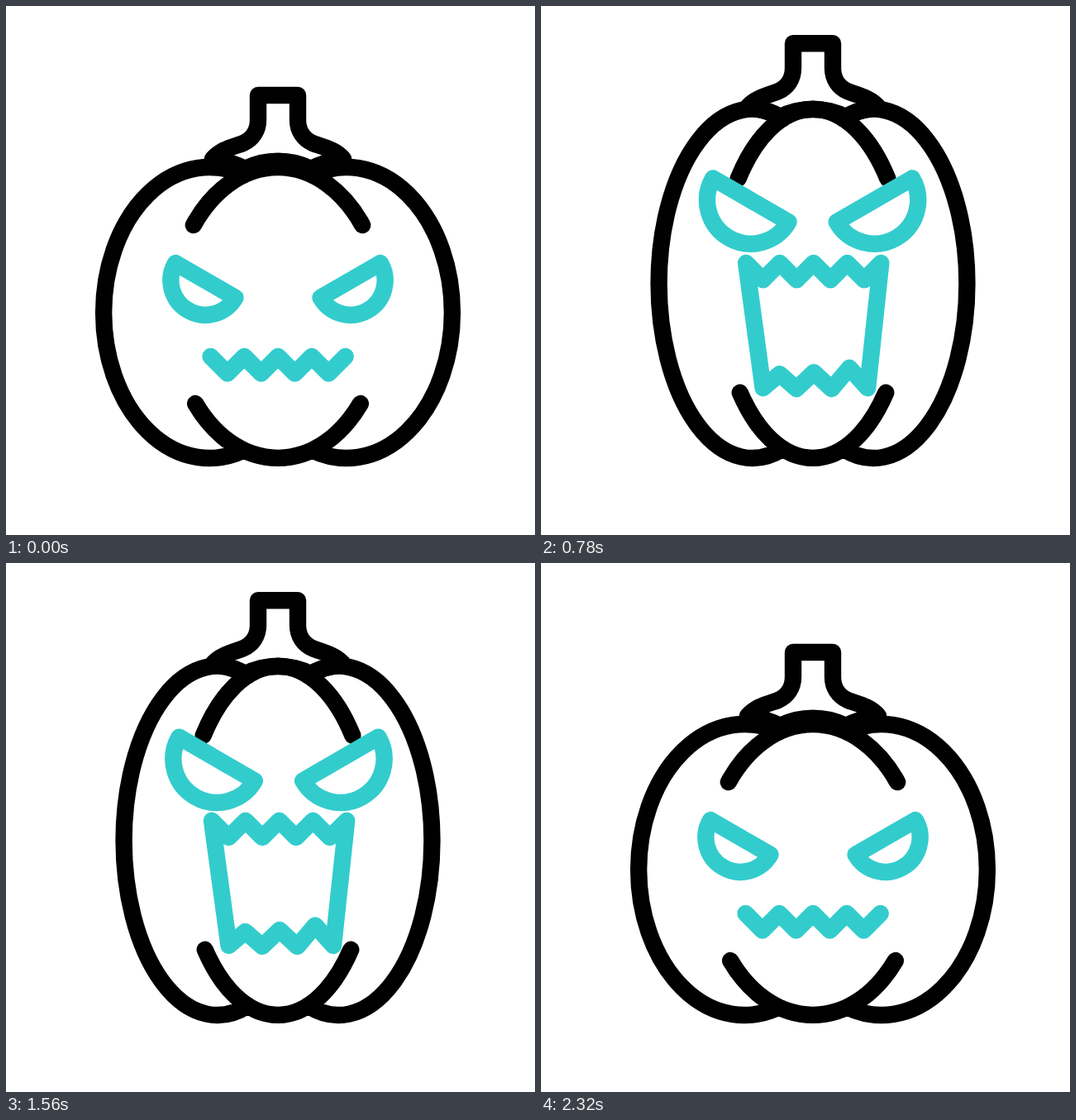
These frames come from a looping animation (640x640 px, 2520 ms). An HTML page:

```html
<!DOCTYPE html>
<html lang="en">
<head>
<meta charset="utf-8">
<title>Pumpkin</title>
<style>
  html, body { margin: 0; width: 100%; height: 100%; overflow: hidden; background: #fff; }
  svg { display: block; width: 100%; height: 100%; }
  path { fill: none; stroke-width: 20.4; stroke-linecap: round; stroke-linejoin: round; }
  #body, #stem { stroke: #000; }
  #eyes, #mouth { stroke: #33cccc; }
</style>
</head>
<body>
<svg viewBox="0 0 640 640">
  <path id="body"/>
  <path id="stem" d="M250 185C260 173 277 170 287 166C298 161 305 151 305 138V108H353V138C353 151 360 161 371 166C381 170 398 173 408 185Q386 188 369 197Q350 187.7 329 187.7Q308 187.7 289 197Q272 188 250 185Z"/>
  <path id="eyes"/>
  <path id="mouth"/>
</svg>
<script>
const LOOP = 2520, RISE = 200, FALL_END = 2318, MID = 329, FLOOR = 547;
const $ = id => document.getElementById(id);
const lerp = (a, b, p) => a + (b - a) * p;
const clamp = v => Math.max(0, Math.min(1, v));
const smooth = u => u * u * (3 - 2 * u);

// 0 at rest, 1 fully stretched
const stretch = (t, duration) =>
  smooth(clamp(Math.min(t - RISE, FALL_END - t) / duration));

function bodyPath(p) {
  const sx = lerp(1, 0.884, p), sy = lerp(1, 1.2, p);
  const rx = 128 * sx, ry = 176 * sy, cy = FLOOR - ry;
  // elliptic arc between two points given in units of the radii
  const arc = (cx, x1, y1, x2, y2, flags) =>
    `M${cx + x1 * rx} ${cy + y1 * ry}A${rx} ${ry} 0 ${flags} ${cx + x2 * rx} ${cy + y2 * ry}`;
  return arc(MID - 83 * sx, 0.328, -0.945, 0.328, 0.945, '1 0')
    + arc(MID + 83 * sx, -0.328, -0.945, -0.328, 0.945, '1 1')
    + arc(MID, -0.798, -0.602, 0.798, -0.602, '0 1')
    + arc(MID, -0.78, 0.625, 0.78, 0.625, '0 0');
}

function eyesPath(p, dx, dy) {
  const r = lerp(41.8, 52.8, p), gap = lerp(87.8, 74.8, p);
  const cy = lerp(332, 234.7, p) + dy;
  const ux = r * Math.cos(Math.PI / 6), uy = r / 2;
  const eye = (side, sweep) => {
    const cx = MID + side * gap + dx;
    return `M${cx + side * ux} ${cy - uy}A${r} ${r} 0 0 ${sweep} ${cx - side * ux} ${cy + uy}Z`;
  };
  return eye(-1, 0) + eye(1, 1);
}

const jaw = [[268, 462], [288, 445], [308.5, 463], [329.5, 443], [351, 463], [372.5, 437.5], [394.5, 462]];

function mouthPath(p, dx, dy) {
  const zig = i => [247.5 + 20.4 * i, i % 2 ? 444.5 : 424];
  const upper = Array.from({ length: 9 }, (_, i) => {
    const [x, y] = zig(i);
    return [x, y - 113.3 * p];
  });
  const lower = jaw.map(([x, y], i) => {
    const [x0, y0] = zig(i + 1);
    return [lerp(x0, x, p), lerp(y0, y, p)];
  }).reverse();
  return 'M' + upper.concat(lower).map(([x, y]) => `${x + dx} ${y + dy}`).join('L') + 'Z';
}

function draw(t) {
  const p = stretch(t, 183), eyeP = stretch(t, 190);
  const a = (t - 1340) / 108 * 2 * Math.PI;
  const shake = eyeP === 1 ? 1 : 0;
  $('body').setAttribute('d', bodyPath(p));
  $('stem').setAttribute('transform', `translate(0 ${-62.7 * p})`);
  $('eyes').setAttribute('d', eyesPath(eyeP,
    shake * (-1.6 + 2.7 * Math.cos(a)),
    shake * (1.1 + 1.55 * Math.cos(2 * a))));
  $('mouth').setAttribute('d', mouthPath(p,
    shake * (0.35 + 1.5 * Math.sin(3 * a)),
    shake * 1.2 * Math.sin(3 * a)));
}

const start = performance.now();
function tick() {
  draw((performance.now() - start) % LOOP);
  requestAnimationFrame(tick);
}
tick();
</script>
</body>
</html>
```
